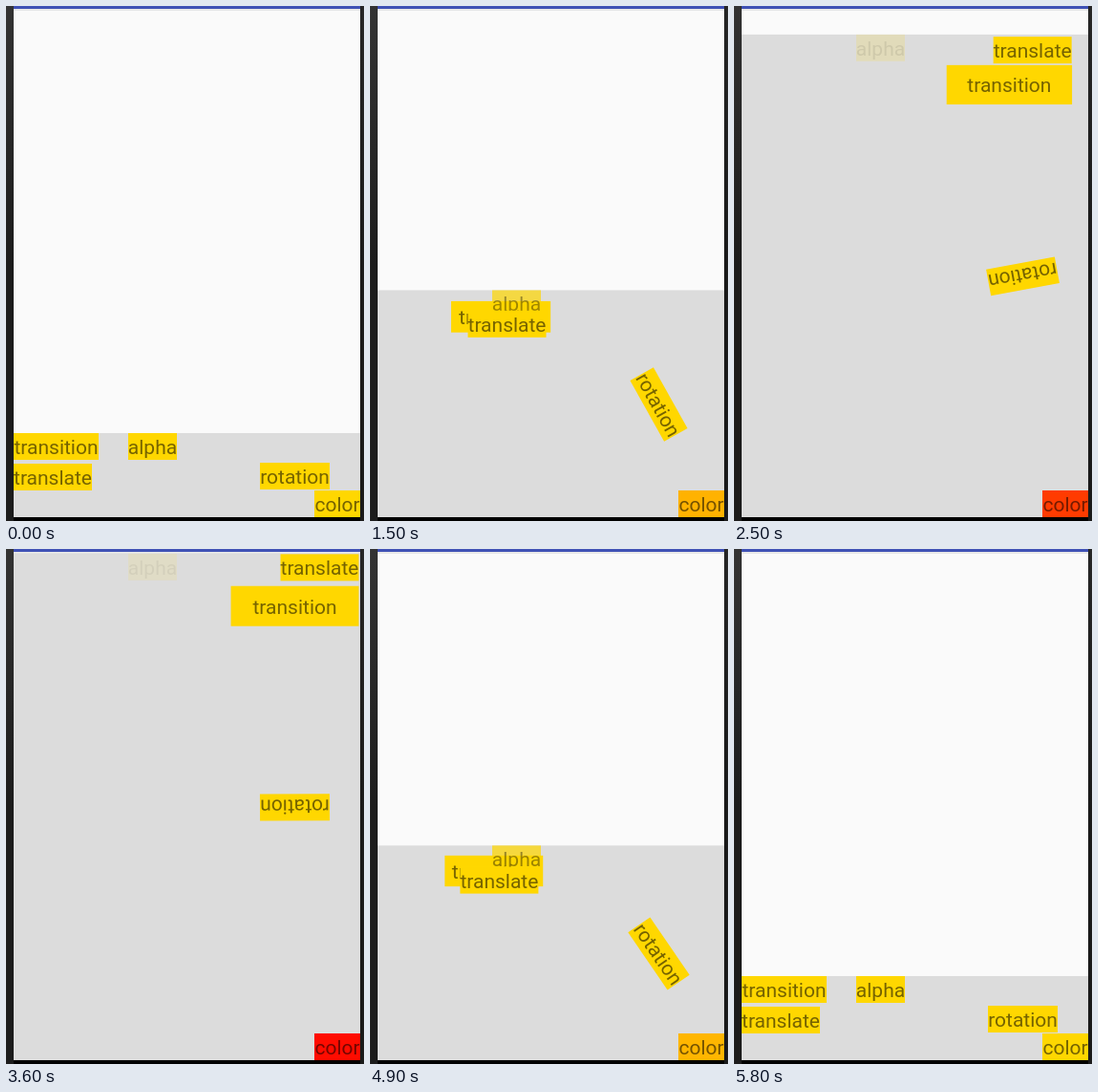
Recreate the animation shown at these times as an HTML page with a canvas. Size 375 px wide and 539 px high, loop 6500 ms.

```html
<!DOCTYPE html>
<html lang="en">
<head>
<meta charset="utf-8">
<style>
  html, body { margin: 0; height: 100%; overflow: hidden; background: #000; }
  canvas { display: block; }
</style>
</head>
<body>
<canvas id="stage" width="375" height="539"></canvas>
<script>
const ctx = document.getElementById('stage').getContext('2d');
const LOOP = 6500, STEP = 100;
const GOLD = '#ffd700';

const mix = (a, b, p) => a + (b - a) * p;

// Accelerate-decelerate curve between two times
function ease(t, start, end) {
  const x = Math.min(1, Math.max(0, (t - start) / (end - start)));
  return (1 - Math.cos(Math.PI * x)) / 2;
}

function rect(x, y, w, h, fill) {
  ctx.fillStyle = fill;
  ctx.fillRect(x, y, w, h);
}

// Label centred in its box, turned about the box centre
function chip(text, x, y, w, h = 28, { fill = GOLD, alpha = 1, angle = 0 } = {}) {
  ctx.save();
  ctx.globalAlpha = alpha;
  ctx.translate(x + w / 2, y + h / 2);
  ctx.rotate(angle);
  rect(-w / 2, -h / 2, w, h, fill);
  ctx.fillStyle = 'rgba(0,0,0,.54)';
  ctx.fillText(text, 0, 8);
  ctx.restore();
}

function sideStrip(x, w, top, bottom) {
  const shade = ctx.createLinearGradient(0, 0, 0, 539);
  shade.addColorStop(0, top);
  shade.addColorStop(0.5, bottom);
  rect(x, 0, w, 539, shade);
}

function draw(time) {
  const t = Math.floor(time % LOOP / STEP) * STEP;
  const p = ease(t, 623, 2845) - ease(t, 3541, 5715);
  const top = mix(447, 4, p);

  rect(0, 0, 375, 539, '#000');
  sideStrip(0, 8, '#333', '#1c1c1c');
  sideStrip(371, 4, '#262626', '#1a1a1a');
  rect(8, 0, 363, 535, '#fafafa');
  rect(8, top, 363, 535 - top, '#dcdcdc');
  rect(8, 3, 363, 2, 'rgba(0,0,0,.07)');
  rect(8, 0, 363, 3, '#3f51b5');

  ctx.font = '21px Roboto, sans-serif';
  ctx.textAlign = 'center';
  chip('transition', mix(8, 236, p), mix(447, 38, p), mix(89, 134, p), mix(28, 42, p));
  chip('alpha', 128, top, 51, 28, { alpha: mix(1, 0.1, p) });
  chip('translate', mix(8, 288, p), mix(479, 4.5, p), 82);
  chip('rotation', 266, mix(478, 256, p), 73, 28, { angle: Math.PI * p });
  // The colour blends in linear light
  const green = Math.round(215 * Math.pow(1 - p, 1 / 2.2));
  chip('color', 323, 507, 48, 28, { fill: `rgb(255,${green},0)` });
}

function tick() {
  draw(performance.now());
  requestAnimationFrame(tick);
}
tick();
</script>
</body>
</html>
```
